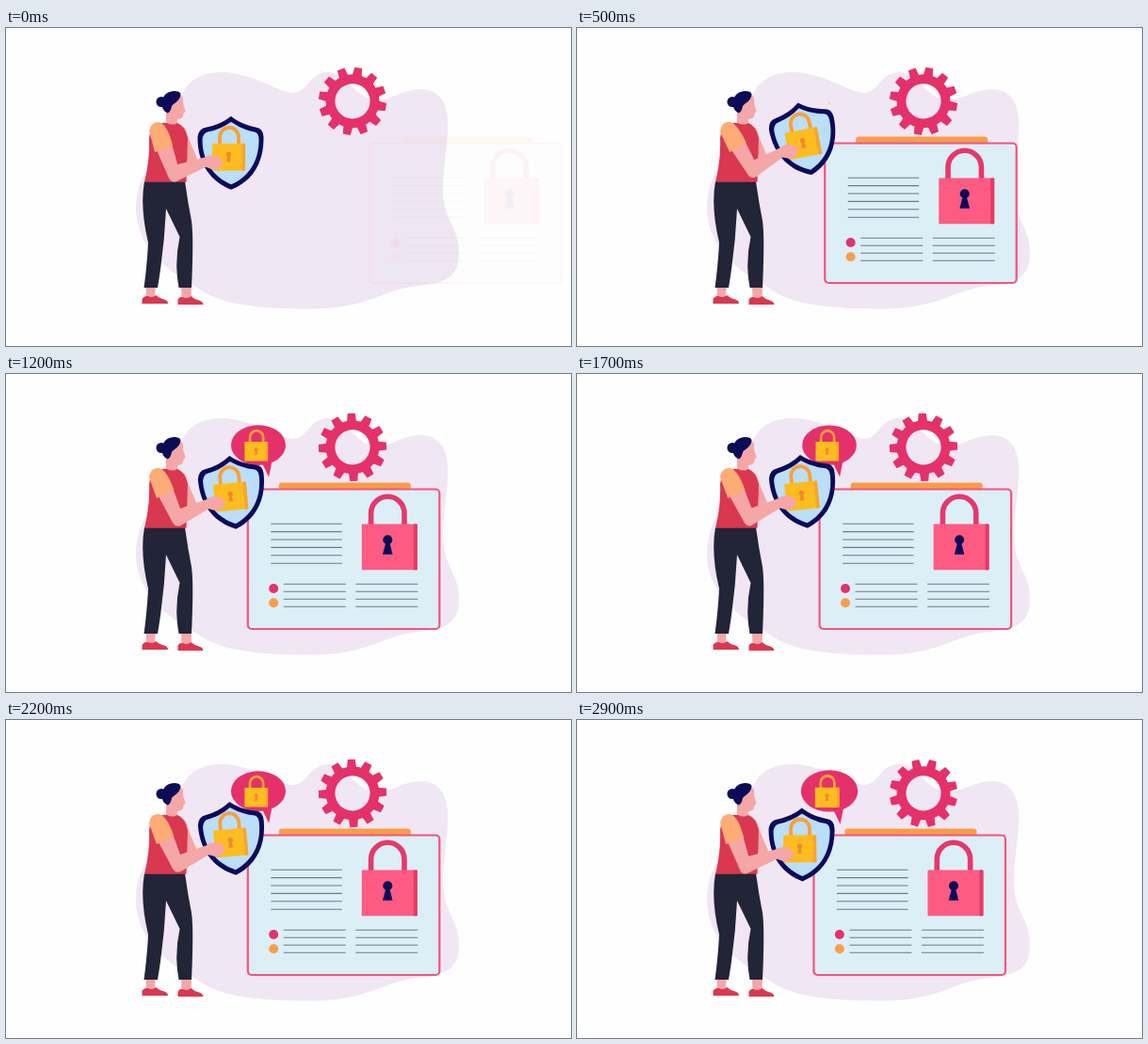
An HTML page that plays this animation: 600x338 px, repeating every 3 s.

```html
<!DOCTYPE html>
<html lang="en">
<head>
<meta charset="utf-8">
<title>Data security</title>
<style>
  html, body { margin: 0; width: 100%; height: 100%; overflow: hidden; background: #fffeff; }
  svg { display: block; width: 600px; height: 338px; }
</style>
</head>
<body>
<svg viewBox="0 0 600 338">
  <defs>
    <g id="padlock">
      <path d="M8 22V12a10 10.500 0 0 1 20 0v10" fill="none" stroke="#f9a037" stroke-width="3.800"/>
      <rect y="18.500" width="35" height="29" rx="1" fill="#fdbd20"/>
      <path d="M31.500 18.500H34a1 1 0 0 1 1 1v27a1 1 0 0 1-1 1h-2.500z" fill="#f7a52b"/>
      <circle cx="17.300" cy="30" r="2.800" fill="#f08a2c"/>
      <path d="M16.200 31h2.200l1.200 7h-4.600z" fill="#f08a2c"/>
    </g>
  </defs>

  <path fill="#f1e6f3" d="M183 85C186 61 202 47 228 47C260 47 283 65 303 69C321 70 321 47 342 47C364 47 372 80 398 76C414 74 423 65 440 65C462 65 471 82 469 111C467 143 460 170 467 194C473 211 481 219 481 239C481 264 468 271 438 274C402 277 385 298.500 325 298.500C270 298.500 228 295 203 276C174 260 138 235 138 190C138 147 175 126 183 85Z"/>
  <g id="gear" fill="#e4316a"></g>

  <g id="bubble">
    <ellipse cx="268" cy="75.500" rx="30" ry="22" fill="#e4316a"/>
    <path d="M272 95L279.500 110.500L283 93Z" fill="#e4316a"/>
    <use href="#padlock" transform="translate(252.900 58.300) scale(.73)"/>
  </g>

  <g id="panel">
    <path d="M34 122v-3.500a3 3 0 0 1 3-3H171a3 3 0 0 1 3 3V122z" fill="#f99d49"/>
    <rect x="1" y="122.500" width="203.500" height="148.500" rx="4" fill="#dceef6" stroke="#f4557d" stroke-width="2.200"/>
    <path id="rules" fill="none" stroke="#6f7a86" stroke-width="1.100"/>
    <circle cx="28.400" cy="228" r="5" fill="#e4316a"/>
    <circle cx="28.400" cy="243.300" r="5" fill="#f99d49"/>
    <path d="M131.800 162V148a17.700 17.700 0 0 1 35.400 0v14" fill="none" stroke="#e4396c" stroke-width="5.600"/>
    <rect x="122" y="159.500" width="59" height="48.800" rx="1" fill="#fe5b82"/>
    <path d="M177 159.500h3a1 1 0 0 1 1 1v46.800a1 1 0 0 1-1 1h-3z" fill="#e43a69"/>
    <circle cx="149.500" cy="176.300" r="5" fill="#0c0b57"/>
    <path d="M147.800 178h3.400l3.600 13.700h-10.600z" fill="#0c0b57"/>
  </g>

  <!-- far arm and lower body -->
  <path d="M183 102Q192 105 193 115L203 139L198 149L187 134Z" fill="#f4a7a6"/>
  <path d="M149 274h10l-1.500 13h-9zM186 274h11l-.5 14h-10z" fill="#f4a7a6"/>
  <path d="M144.500 293v-5q2-3.500 6-3q5 2.500 8.500-1q4 3.500 9 4.500q4 1 4 4.500zM182.500 294v-5q1-3.500 5-3q5 2.500 9-1q3.500 3.500 8.500 4.500q4 1 4.500 4.500z" fill="#d93850"/>
  <path d="M147 163H190Q193 185 197 205Q199.500 222 197 276H183.500Q178.500 250 184.500 222L170 192Q168 235 161 276H146.500Q150 250 151 228Q142 190 147 163Z" fill="#222438"/>

  <!-- head and torso -->
  <path d="M170 79L184 70Q189 72 188 80L190.700 89L188.500 90.500Q189 97 182 97L182 105H170V88Z" fill="#f4a7a6"/>
  <circle cx="165" cy="78.500" r="5.500" fill="#0c0b57"/>
  <path d="M166 79C166 65 184 65 185.500 70C185 78 179 79 176 83C175 88 173 91 171 90C167 88 165 84 166 79Z" fill="#0c0b57"/>
  <path d="M154 106Q162 100 171 101Q177 104 182 101Q190 104 193 117L191.500 163.700H147Q153 140 152 117Z" fill="#d93850"/>

  <g id="arm">
    <path d="M239 94Q250 103 266 106Q273 107 273.500 116C274 145 260 164 239 172C218 164 203 145 203.500 116Q205 107 212 106Q228 103 239 94Z" fill="#0b0a5b"/>
    <path d="M239 100Q250 108 263 110.500Q268 111 268.500 118C269 142 257 159 239 166.500C221 159 208 142 208.500 118Q210 111 215 110.500Q228 108 239 100Z" fill="#bbdefb"/>
    <use href="#padlock" transform="translate(219 104.500)"/>
    <path d="M158 125L175 119L182 145L210 138Q216 134 223 136Q229 138 230 143Q229 150 220 151L212 148L181 163Q176 165 173 160Z" fill="#f4a7a6"/>
    <path d="M152 109Q154 100 162 100Q171 101 177 125L158 132Z" fill="#feac76"/>
  </g>
</svg>
<script>
  const LOOP = 3000, STEP = 100;
  const $ = id => document.getElementById(id);
  const clamp = v => Math.min(1, Math.max(0, v));
  const put = (id, value) => $(id).setAttribute("transform", value);

  function buildGear() {
    const ring = r => `M${-r} 0a${r} ${r} 0 1 0 ${2 * r} 0a${r} ${r} 0 1 0 ${-2 * r} 0z`;
    let parts = `<path fill-rule="evenodd" d="${ring(28.5)}${ring(18.6)}"/>`;
    for (let a = 0; a < 360; a += 30)
      parts += `<path d="M-5-27L-4-36H4L5-27z" transform="rotate(${a})"/>`;
    $("gear").innerHTML = parts;
  }

  function buildRules() {
    let d = "";
    for (let i = 0; i < 6; i++) d += `M25.500 ${159.2 + i * 8.4}h75.500`;
    for (let i = 0; i < 4; i++) d += `M39 ${223.3 + i * 8}h66M115.500 ${223.3 + i * 8}h66`;
    $("rules").setAttribute("d", d);
  }

  function backOut(p) {
    const q = p - 1;
    return 1 + 2.7 * q ** 3 + 1.7 * q ** 2;
  }

  function draw(time) {
    const t = Math.floor((time % LOOP) / STEP) * STEP;
    const sway = (1 - Math.cos(2 * Math.PI * (t / 1000 + 0.04))) / 2;

    const slide = clamp(t / 500);
    put("panel", `translate(${250 + 12.4 * sway + 135 * (1 - slide) ** 3} 0)`);
    $("panel").setAttribute("opacity", clamp(0.05 + t / 350));

    put("arm", `rotate(${-11 * sway} 160 110)`);
    put("gear", `translate(368 77.8) rotate(${10 - 0.06 * t})`);

    const pop = t < 500 ? 0 : backOut(clamp((t - 498) / 500));
    const size = pop * (1.01 - 0.09 * sway);
    put("bubble", `translate(268 80) scale(${size}) translate(-268 -80)`);
  }

  buildGear();
  buildRules();
  const start = performance.now();
  function tick() {
    draw(performance.now() - start);
    requestAnimationFrame(tick);
  }
  tick();
</script>
</body>
</html>
```
